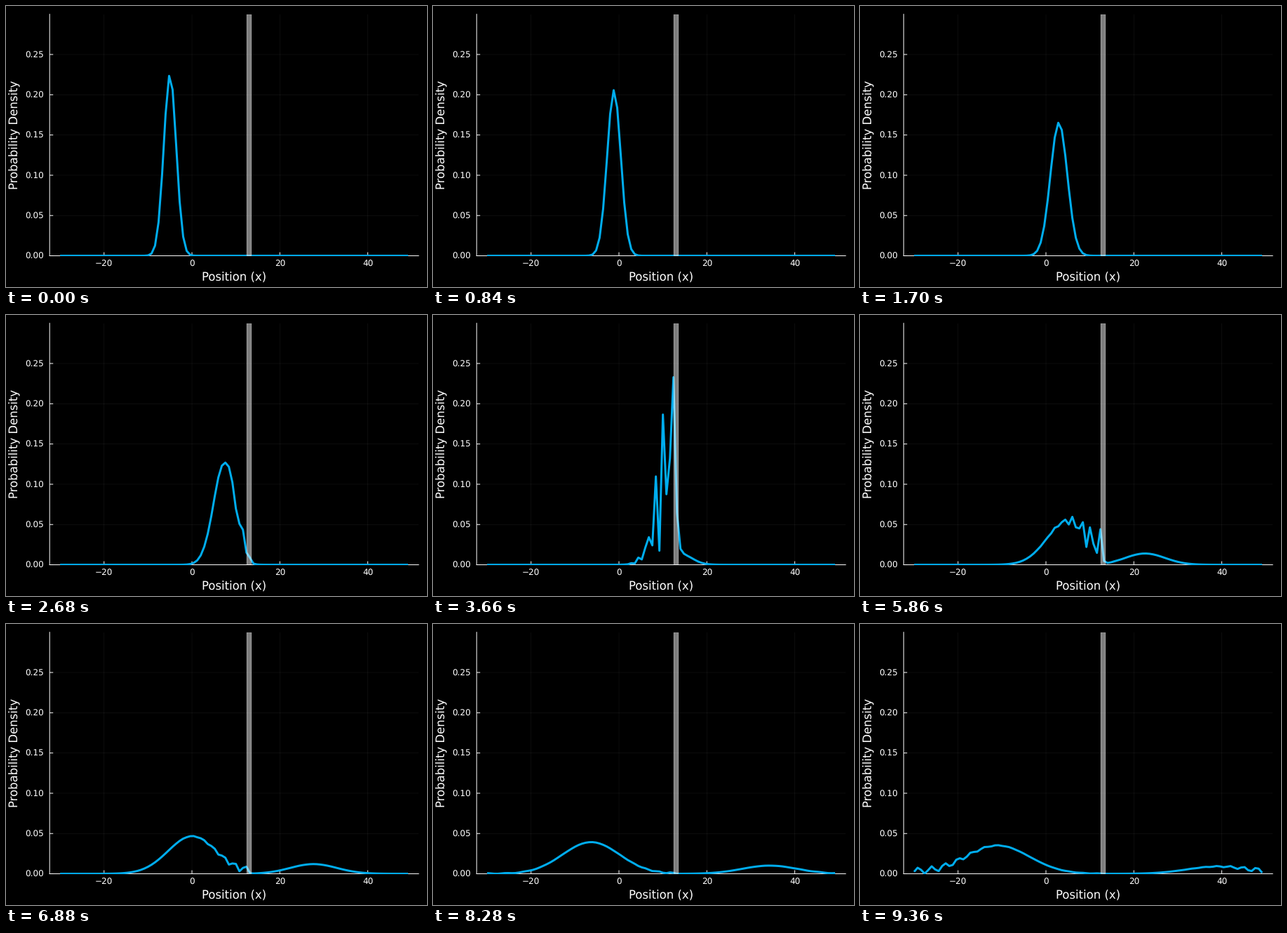
These frames come from a looping animation (600 by 400 pixels, 9460 ms). A matplotlib script:

```python
import numpy as np
import matplotlib.pyplot as plt
from matplotlib.animation import FuncAnimation

W, H, DPI = 600, 400, 100
LEFT, RIGHT, TOP, BOTTOM = 62.2, 588.1, 11.7, 355.55
PX = 72 / DPI  # one pixel in points

# Periodic position grid
N, X_MIN, X_MAX = 100, -30.0, 50.0
DX = (X_MAX - X_MIN) / N
x = X_MIN + DX * np.arange(N)

# Gaussian packet and barrier (hbar = m = 1)
X0, P0, SIGMA = -5.0, 2.147, 2.0
WALL, V0 = (12.5, 13.5), 3.0
DT, STEPS = 0.1, 201
TICK_MS = 20


def densities():
    """|psi|^2 at every time step, by exact diagonalisation."""
    p = 2 * np.pi * np.fft.fftfreq(N, DX)
    kinetic = np.fft.ifft(p[:, None] ** 2 / 2 * np.fft.fft(np.eye(N), axis=0), axis=0)
    inside = (x >= WALL[0]) & (x <= WALL[1])
    ham = kinetic + np.diag(V0 * inside)
    energy, modes = np.linalg.eigh((ham + ham.conj().T) / 2)

    psi = np.exp(1j * P0 * x - (x - X0) ** 2 / (2 * SIGMA**2))
    psi /= np.linalg.norm(psi)
    coeff = modes.conj().T @ psi
    t = DT * np.arange(STEPS)
    return np.abs((coeff * np.exp(-1j * np.outer(t, energy))) @ modes.T) ** 2


rho = densities()

# Steps are held 20, 100, 20 ms in turn; the last one for 100 ms
holds = np.tile([1, 5, 1], STEPS // 3)
holds[-1] = 5
schedule = np.repeat(np.arange(STEPS), holds)

plt.rcParams.update({"font.family": "DejaVu Sans", "text.hinting": "none"})
fig = plt.figure(figsize=(W / DPI, H / DPI), dpi=DPI, facecolor="black")
ax = fig.add_axes([LEFT / W, 1 - BOTTOM / H, (RIGHT - LEFT) / W, (BOTTOM - TOP) / H],
                  facecolor="black")
pad = 0.03 * (x[-1] - x[0])
ax.set_xlim(x[0] - pad, x[-1] + pad)
ax.set_ylim(0, 0.3)
x_ticks = [-20, 0, 20, 40]
y_ticks = np.arange(6) * 0.05
ax.set_xticks(x_ticks)
ax.set_yticks(y_ticks)
ax.yaxis.set_major_formatter("{x:.2f}")
ax.set_axisbelow(True)
ax.tick_params(length=0, labelcolor="white", labelsize=12 * PX)
ax.tick_params(axis="x", pad=6.3 * PX)
ax.tick_params(axis="y", pad=8 * PX)

# Grid, axes and inward ticks, all antialiased rather than snapped to pixels
ax.grid(color="white", alpha=0.1, linewidth=0.5 * PX, snap=False)
for side, spine in ax.spines.items():
    spine.set(visible=side in ("left", "bottom"), color="white", linewidth=PX,
              zorder=1, snap=False)
tick_style = dict(color="white", linewidth=PX, zorder=1, snap=False)
ax.vlines(x_ticks, 0, 5 / (BOTTOM - TOP), transform=ax.get_xaxis_transform(), **tick_style)
ax.hlines(y_ticks, 0, 5 / (RIGHT - LEFT), transform=ax.get_yaxis_transform(), **tick_style)


def label(px, py, text, angle=0):
    fig.text(px / W, 1 - py / H, text, color="white", fontsize=16.5 * PX, rotation=angle,
             rotation_mode="anchor", ha="center", va="baseline")


label((LEFT + RIGHT) / 2 + 0.3, 392, "Position (x)")
label(17, (TOP + BOTTOM) / 2, "Probability Density", 90)

curve, = ax.plot(x, rho[0], color="#00adee", linewidth=3 * PX, zorder=2,
                 solid_capstyle="butt", solid_joinstyle="round")
ax.axvspan(*WALL, facecolor=(1, 1, 1, 0.5), edgecolor=(1, 1, 1, 0.5),
           linewidth=PX, zorder=3, snap=False)


def update(i):
    curve.set_ydata(rho[schedule[i]])
    return curve,


anim = FuncAnimation(fig, update, frames=len(schedule), interval=TICK_MS,
                     repeat=True, repeat_delay=0, blit=False)
plt.show()
```
